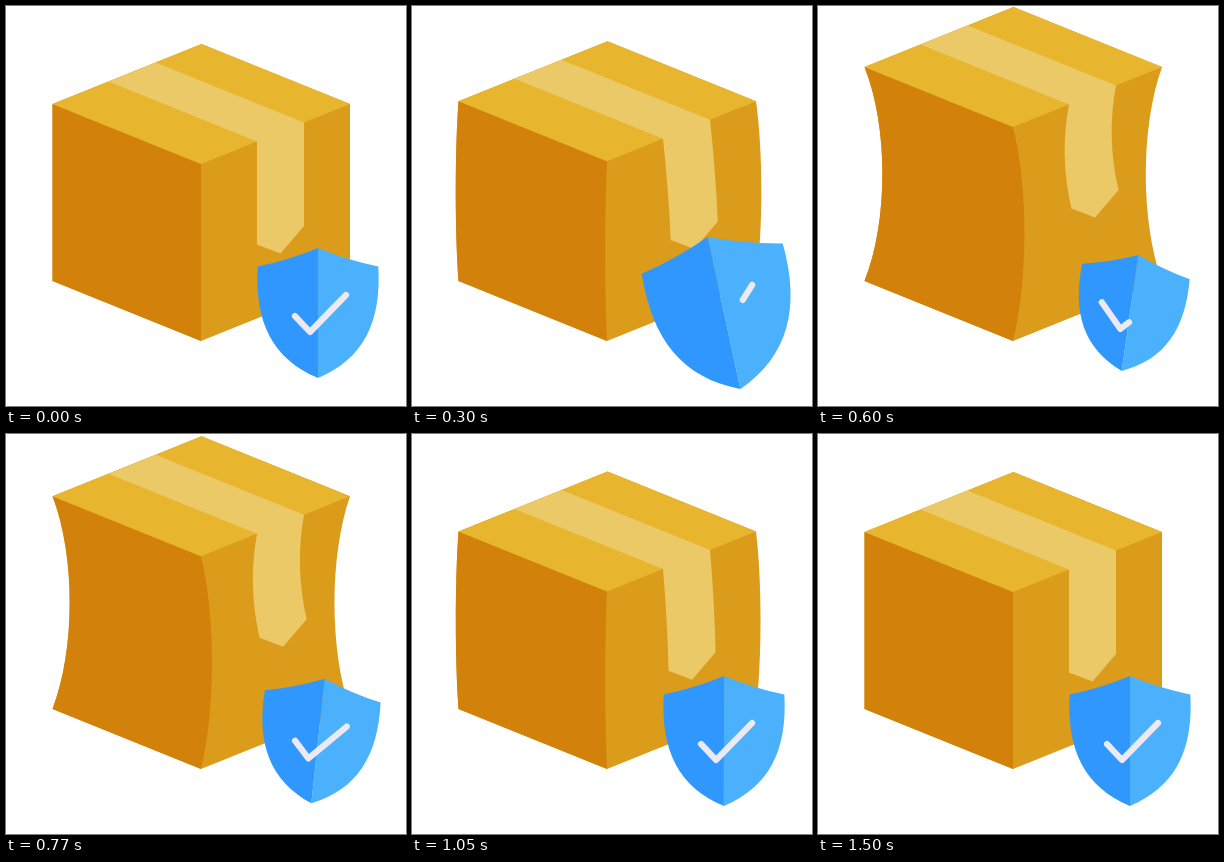
Recreate the animation shown at these times as an HTML page. Size 400 by 400 pixels, loop 1520 ms.

```html
<!DOCTYPE html>
<html lang="en">
<head>
<meta charset="utf-8">
<title>Protected parcel</title>
<style>
  html, body { margin: 0; width: 100%; height: 100%; overflow: hidden; background: #fff; }
  svg { display: block; width: 100%; height: 100%; }
</style>
</head>
<body>
<svg viewBox="0 0 400 400">
  <path id="body" fill="#db9c1c"/>
  <path id="side" fill="#d2820a"/>
  <path id="lid" fill="#e8b52f"/>
  <path id="tape" fill="#ecc967"/>
  <g id="shield">
    <path fill="#4cb1fd" d="M0-65Q29-53 60.300-46.500C63.500 9 45.500 46 0 65Z"/>
    <path fill="#3097fe" d="M0-65Q-29-53-60.300-46.500C-63.500 9-45.500 46 0 65Z"/>
    <path id="check" fill="none" stroke="#ece9f1" stroke-linecap="round" stroke-linejoin="round"/>
  </g>
</svg>
<script>
const LOOP = 1520;
const [body, side, lid, tape, shield, check] =
  ['body', 'side', 'lid', 'tape', 'shield', 'check'].map(id => document.getElementById(id));

const mix = (a, b, u) => a + (b - a) * u;

// Eased 0..1 between two times; bias below 1 moves early, above 1 late.
function ease(t, from, to, bias = 1) {
  const u = Math.min(1, Math.max(0, (t - from) / (to - from))) ** bias;
  return u * u * (3 - 2 * u);
}

// The box squashes, springs tall, then squashes a little again.
function boxPose(t) {
  const rise = ease(t, 185, 615, 0.66);
  const fall = ease(t, 700, 1180, 1.2);
  const squash = ease(t, 0, 185) - rise + 0.59 * (fall - ease(t, 1180, 1500));
  const stretch = rise - fall;
  return {
    y: 18.4 * squash - 37.2 * stretch,
    pinch: -15.4 * squash + 18 * stretch,
    sway: 11 * squash + 2.5 * stretch
  };
}

// Upright edge from (x, y0) to (x, y1), bowed sideways by `bow`.
function edge(x, y0, y1, bow) {
  const c = x + bow * 4 / 3;
  return `C${c} ${mix(y0, y1, 0.28)} ${c} ${mix(y0, y1, 0.72)} ${x} ${y1}`;
}

function drawBox(t) {
  const { y, pinch, sway } = boxPose(t);
  const top = 98 + y, front = 158 + y, back = 38 + y;
  const left = `M46.500 275${edge(46.5, 275, top, pinch)}`;

  body.setAttribute('d', `${left}L195.500 ${back}L344 ${top}` +
    `${edge(344, top, 275, 0.35 * sway - 0.95 * pinch)}L195 335Z`);
  side.setAttribute('d', `${left}L195 ${front}${edge(195, front, 335, 0.64 * pinch)}Z`);
  lid.setAttribute('d', `M46.500 ${top}L195.500 ${back}L344 ${top}L195 ${front}Z`);

  const bend = sway / 2 - 0.62 * pinch;
  const low = 0.95 * y - 0.25 * sway;
  tape.setAttribute('d', `M149.500 ${56.5 + y}L102.500 ${75.5 + y}L251 ${135.5 + y}` +
    `Q${251 + bend} ${187 + y} ${251 + sway} ${238.5 + low}` +
    `L${274.5 + sway} ${247.5 + low}L${298 + sway} ${220 + low}` +
    `Q${298 + bend} ${168 + y} 298 ${116.5 + y}Z`);
}

// The tick is a window on a bent line; positions are distances from its corner.
const ENTRY = -36, START = -21.9, END = 51.6;

function tickPoint(s) {
  const [dx, dy] = s < 0 ? [0.685, 0.73] : [0.698, -0.717];
  return `${-8 + dx * s} ${19 + dy * s}`;
}

function drawTick(t, size) {
  const leaving = t < 420;
  const a = leaving ? mix(START, END, ease(t, 115, 375)) : mix(ENTRY, START, ease(t, 620, 800));
  const b = leaving ? END : mix(ENTRY, END, ease(t, 435, 745));
  const stops = a < 0 && b > 0 ? [a, 0, b] : [a, b];
  check.setAttribute('d', b - a < 0.5 ? '' : 'M' + stops.map(tickPoint).join('L'));
  check.setAttribute('stroke-width', 6.2 / size);
}

function drawShield(t) {
  const size = 1 + 0.23 * ease(t, 0, 185) - 0.33 * ease(t, 185, 605, 1.25) + 0.1 * ease(t, 605, 880);
  const turn = -12.2 * ease(t, 0, 180) + 20.5 * ease(t, 400, 610) - 8.3 * ease(t, 610, 1080);
  shield.setAttribute('transform', `translate(312 307) rotate(${turn}) scale(${size})`);
  drawTick(t, size);
}

let begin;
function frame(now) {
  begin ??= now;
  const t = (now - begin) % LOOP;
  drawBox(t);
  drawShield(t);
  requestAnimationFrame(frame);
}
requestAnimationFrame(frame);
</script>
</body>
</html>
```
